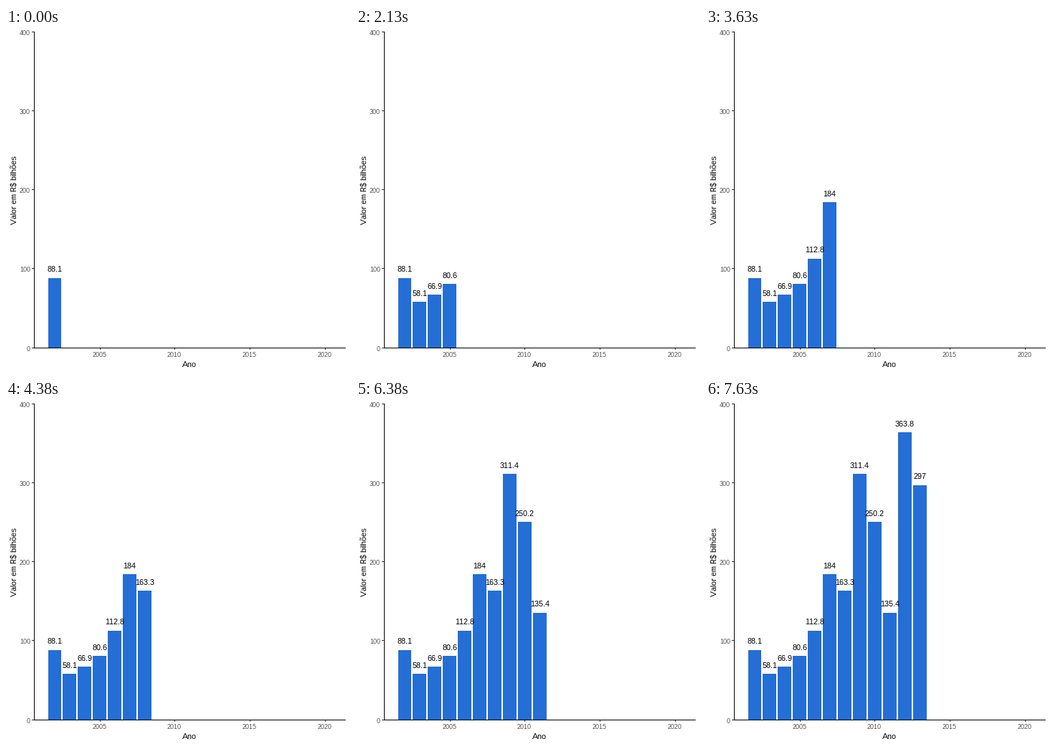
Animation of 480x480 px, one loop 8 s. Source, as a matplotlib script:

```python
from math import floor

import matplotlib.pyplot as plt
from matplotlib.animation import FuncAnimation
from matplotlib.patches import Rectangle

plt.rcParams.update({
    "font.family": "Liberation Sans",
    "text.hinting": "native",
    "text.hinting_factor": 1,
})

SIZE, DPI = 480, 80
FRAMES, INTERVAL = 64, 125
BLUE, GREY, TICK = "#246ed5", "#4d4d4d", "#333333"
FIRST_YEAR = 2002
VALUES = [88.1, 58.1, 66.9, 80.6, 112.8, 184, 163.3, 311.4, 250.2, 135.4,
          363.8, 297]
# (last resting frame, number of steps) for each move to the next year
MOVES = [(2 + 6 * k, 3) for k in range(7)] + [(44 + 5 * k, 2) for k in range(4)]

fig = plt.figure(figsize=(SIZE / DPI, SIZE / DPI), dpi=DPI, facecolor="white")
ax = fig.add_axes([0, 0, 1, 1])
ax.set(xlim=(0, SIZE), ylim=(SIZE, 0))
ax.axis("off")


def px(year):
    return 38.8 + (year - 2000.605) * 20.92


def py(value):
    return 446 - value * 1.1012


def box(x, y, w, h, color, z=1):
    patch = Rectangle((x, y), w, h, facecolor=color, linewidth=0, snap=False,
                      zorder=z)
    return ax.add_patch(patch)


def text(x, y, s, size=11, color="black", ha="center", **kw):
    return ax.text(x, y, s, fontsize=size * 72 / DPI, color=color, ha=ha,
                   va="baseline", zorder=4, **kw)


class Bar:
    def __init__(self):
        self.rect = box(0, 0, 0, 0, BLUE)
        self.label = text(0, 0, "")

    def place(self, year, value, label):
        left, right = round(px(year - 0.45)), round(px(year + 0.45))
        top = round(py(value))
        self.rect.set_bounds(left, top, right - left, 446 - top)
        self.label.set_position((px(year), floor(py(value) - 8)))
        self.label.set_text(f"{label:g}")

    def show(self, on):
        self.rect.set_visible(on)
        self.label.set_visible(on)


def draw_axes():
    box(39, 5, 1, 442, "black", 3)
    box(39, 446, 435, 1, "black", 3)
    for value in range(0, 401, 100):
        y = int(py(value))
        box(36, y, 3, 1, TICK, 3)
        text(34, y + 5, str(value), 9, GREY, "right")
    for year in range(2005, 2021, 5):
        x = round(px(year))
        box(x, 447, 1, 2, TICK, 3)
        text(x, 459, str(year), 9, GREY)
    text(256, 473, "Ano")
    text(15, 226, "Valor em R$ bilhões", rotation=90, rotation_mode="anchor")


draw_axes()
bars = [Bar() for _ in VALUES]
for i, v in enumerate(VALUES):
    bars[i].place(FIRST_YEAR + i, v, v)
mover = Bar()


def update(frame):
    done = sum(frame >= start + steps for start, steps in MOVES)
    for i, bar in enumerate(bars):
        bar.show(i <= done)
    moving = done < len(MOVES) and frame > MOVES[done][0]
    mover.show(moving)
    if moving:
        start, steps = MOVES[done]
        t = (frame - start) / steps
        a, b = VALUES[done:done + 2]
        mover.place(FIRST_YEAR + done + t, a + (b - a) * t, a if t < 0.5 else b)
    return []


anim = FuncAnimation(fig, update, frames=FRAMES, interval=INTERVAL,
                     repeat=True, repeat_delay=0)
plt.show()
```
